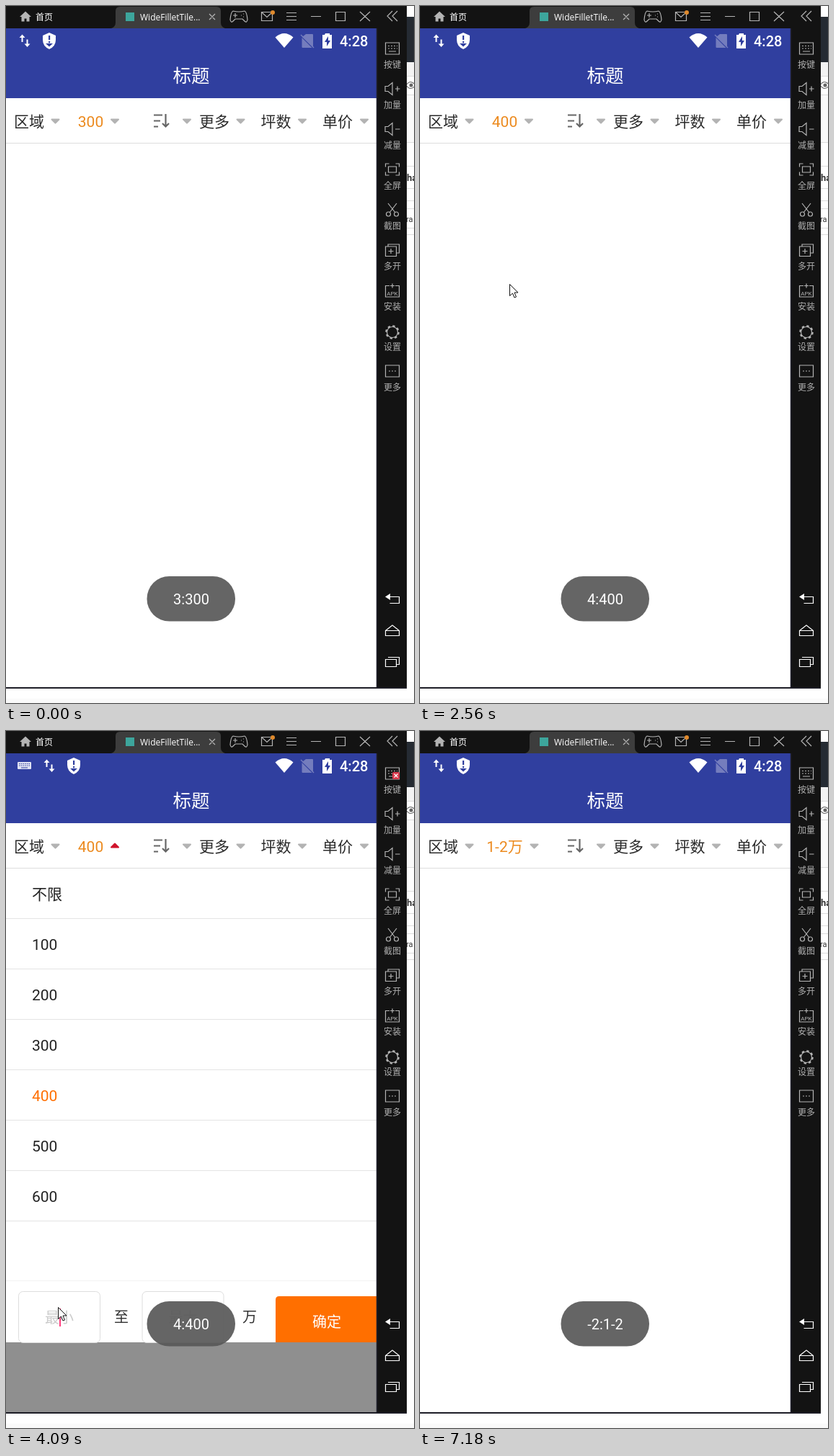
Animation, 566 px wide and 968 px high, one loop 7500 ms. Source, as an HTML page:

```html
<!DOCTYPE html>
<html lang="zh-CN">
<head>
<meta charset="utf-8">
<title>Filter menu</title>
<style>
html, body { margin: 0; width: 100%; height: 100%; overflow: hidden; background: #fff; }
svg { display: block; width: 100vw; height: 100vh; }
text { font-family: Roboto, "Noto Sans CJK SC", "Noto Sans CJK", sans-serif; white-space: pre; }
.mid { text-anchor: middle; }
.line { fill: none; stroke: #b4b4b4; stroke-width: 1.2; }
.ui { font-size: 12px; }
.tab { font-size: 21px; fill: #2a2a2a; }
.field { fill: #fff; stroke: #ddd; }
.in { font-size: 20px; }
</style>
</head>
<body>
<svg viewBox="0 0 566 968">
  <defs>
    <clipPath id="page"><rect y="191" width="514" height="755"/></clipPath>
    <clipPath id="stage"><rect width="566" height="968"/></clipPath>
  </defs>
  <rect width="566" height="968" fill="#fff"/>

  <!-- window behind, at the right edge -->
  <g clip-path="url(#stage)">
    <rect x="556" y="15" width="10" height="63" fill="#252b33"/>
    <rect x="556" y="78" width="10" height="19" fill="#f3f3f3"/>
    <rect x="556" y="124" width="10" height="66" fill="#fafafa"/>
    <path d="M556 97.500h10M556 123.500h10M556 189.500h10M556 222.500h10M556 253.500h10M556 270.500h10M556 281.500h10M556 308.500h10M556 317.500h10" stroke="#ddd"/>
    <path d="M555 110q6-9 13 0q-7 9-13 0z" class="line" style="stroke:#666"/>
    <circle cx="562" cy="110" r="2.500" fill="#666"/>
    <text x="556" y="243" font-size="13" font-weight="700" fill="#333">ha</text>
    <text x="555" y="300" font-size="11" fill="#333">ra</text>
  </g>
  <rect y="962" width="566" height="6" fill="#fafafa"/>

  <!-- page, mask and drop-down panel -->
  <g clip-path="url(#page)">
    <rect id="mask" y="191" width="514" height="755"/>
    <g id="panel">
      <rect y="190" width="514" height="659" fill="#fff"/>
      <g id="content">
        <g id="rows"></g>
        <path d="M0 763.500H514" stroke="#f2f2f2"/>
        <rect class="field" x="17.500" y="778.500" width="113" height="71" rx="6"/>
        <rect class="field" x="189" y="778.500" width="113" height="71" rx="6"/>
        <text id="min" class="in mid" x="74" y="822"></text>
        <text id="max" class="in mid" x="245.500" y="822"></text>
        <rect id="caret" y="802" width="2" height="25" fill="#ff4081"/>
        <g font-size="20" fill="#333" class="mid">
          <text x="160" y="821">至</text><text x="338" y="821">万</text>
        </g>
        <path d="M374 849v-59q0-5 5-5h135v64z" fill="#ff6f00"/>
        <text class="in mid" x="445" y="828" fill="#fff">确定</text>
      </g>
    </g>
  </g>

  <!-- header and filter bar -->
  <rect y="31" width="514" height="97" fill="#303f9f"/>
  <rect y="128" width="514" height="62" fill="#fff"/>
  <path d="M0 190.500H514" stroke="#ddd"/>
  <text x="257" y="106" class="mid" font-size="25.500" fill="#fff">标题</text>
  <g id="kbd">
    <rect x="16" y="43" width="19" height="10" rx="1" fill="#dfe2f2"/>
    <path d="M18 45.500h15M18 48h15" stroke="#303f9f" stroke-dasharray="1.500 1.200"/>
    <path d="M21 51h9" stroke="#303f9f"/>
  </g>
  <g id="status" fill="#fff">
    <path d="M22.500 39.500l4 4.500h-3v6h-2v-6h-3zM29.500 57l-4-4.500h3v-6h2v6h3z"/>
    <path d="M60 37l9 4v6q0 9-9 13q-9-4-9-13v-6z"/>
    <path d="M59 41h2.200v6h-2.200zM59 49h2.200v2.200h-2.200zM55 52h10l-5 4.500z" fill="#303f9f"/>
  </g>
  <path d="M373.500 43.500q12.500-11 25 0L386 58z" fill="#fff"/>
  <path d="M416 39h9q1 0 1 1v17l-15-14zM410.500 44l14 14h-13q-1 0-1-1z" fill="#747dbd"/>
  <path d="M409 40l18 18" stroke="#747dbd" stroke-width="1.500"/>
  <path d="M443 38h6v2h3v19h-13v-19h3z" fill="#fff"/>
  <path d="M447 42l-5 8h3v6l5-8h-3z" fill="#303f9f"/>
  <text x="463" y="56" font-size="20" font-weight="500" fill="#fff">4:28</text>
  <g id="tabs">
    <text id="price" class="tab mid" x="117.500" y="167.500" style="fill:#ec8a1e"></text>
    <path id="priceArrow" d="M-5-2H5L0 3z" stroke-width="2" stroke-linejoin="round"/>
    <path d="M205 151.500h12M205 159.500h9M205 167.500h6M221.500 150v17M217 163l4.500 4.500 4.500-4.500" fill="none" stroke="#666" stroke-width="2.200"/>
  </g>

  <g id="toast">
    <rect x="195.500" y="792" width="122.500" height="62.500" rx="31" fill="#585858" fill-opacity=".92"/>
    <text id="toastText" x="257" y="831" class="in mid" fill="#fff"></text>
  </g>

  <!-- emulator frame -->
  <path d="M0 0H556V948H0V946H514V31H0z" fill="#131313"/>
  <path d="M0 947H556M514.500 31V946" stroke="#20202c" stroke-width="1.500"/>
  <path d="M146 31q6-2 6-8V7q0-6 6-6h134q6 0 6 6v16q0 6 6 8z" fill="#3d3d3d"/>
  <path d="M19 15l8-7.500 8 7.500h-2.500v6.500h-4v-4h-3v4h-4v-6.500z" fill="#b4b4b4"/>
  <text x="41" y="19.500" class="ui" fill="#fff">首页</text>
  <rect x="166" y="9" width="12" height="12" fill="#3da59c"/>
  <text x="186" y="19.500" class="ui" fill="#fff" style="font-family:'Open Sans',sans-serif">WideFilletTile...</text>
  <g class="line">
    <path d="M282 11l8 8M290 11l-8 8M389 9.500h14M389 14.500h14M389 19.500h14M423 14.500h14M457.500 8.500h13v12h-13zM491 8l14 13M505 8l-14 13M536 7l-7 7 7 7M543 7l-7 7 7 7"/>
    <path d="M354.500 8.500h15v12h-15zl7.500 7 7.500-7"/>
    <path d="M315 7q8 2 16 0q3 1 4 12q-1 5-4 2l-3-3h-10l-3 3q-3 3-4-2q1-11 4-12zM315 13h6M318 10v6M326 13h1M329 11h1M329 15h1"/>
  </g>
  <circle cx="370" cy="9" r="3" fill="#e08a2c"/>
  <g id="side"></g>
  <g id="kbdOff">
    <rect x="536" y="57" width="10" height="10" rx="2" fill="#d8394c"/>
    <path d="M538.500 59.500l5 5M543.500 59.500l-5 5" stroke="#fff" stroke-width="1.300"/>
  </g>
  <g fill="none" stroke="#fff" stroke-width="1.200">
    <path d="M532 820.500h13.500v9h-13M526.500 867.500l9.500-7.500 9.500 7.500v7h-19v-7h19M526.500 907.500h15v10h-15zM530 904.500h15.500v10h-4"/>
    <path d="M526 820.500l7-4.500v9z" fill="#fff" stroke="none"/>
  </g>

  <path id="cursor" d="M.5.500V16.500l4-3.500 2.500 6 2.500-1-2.500-6h5z" fill="#fff" stroke="#111"/>
</svg>
<script>
const LOOP = 7500, STEP = 77.5; // the screen refreshes about 13 times a second
const $ = id => document.getElementById(id);
const add = (id, markup) => $(id).insertAdjacentHTML('beforeend', markup);

const ring = (x, y, r) => `M${x - r} ${y}a${r} ${r} 0 1 0 ${2 * r} 0a${r} ${r} 0 1 0 ${-2 * r} 0`;
const speaker = 'M-10-3.500h4l6-5v17l-6-5h-4zM4 0h6.500';
const tools = [
  ['按键', 'M-9.500-8h19v16h-19zM-6-3.500h2m2 0h2m2 0h2m2 0h1M-6 0h2m2 0h2m2 0h2m2 0h1M-5 4h10'],
  ['加量', speaker + 'M7-3.500v7'],
  ['减量', speaker],
  ['全屏', 'M-9.500-3.500v-4.500h5M4.500-8h5v4.500M9.500 3.500v4.500h-5M-4.500 8h-5v-4.500M-5.500-4h11v8h-11z'],
  ['截图', 'M-6-9L4 4M6-9L-4 4' + ring(-5.500, 6, 3) + ring(5.500, 6, 3)],
  ['多开', 'M-6-5v-3h15.500v12h-4M-9.500-5h15v13.500h-15zM-2-2v7M-5.500 1.500h7'],
  ['安装', 'M-4-6.500h-5.500v15.500h19v-15.500h-5.500M0-9.500v6M-3-6.500h6'],
  ['设置', ring(0, 0, 7.5)],
  ['更多', 'M-9.500-8h19v16h-19zM-5 0h2m2 0h2m2 0h2']
];
tools.forEach(([label, d], i) => {
  const y = 59 + 56 * i;
  add('side', `<path class="line" d="${d}" transform="translate(536 ${y + (i == 7 ? 2 : 0)})"/>
    <text class="ui mid" x="536" y="${y + 27}" fill="#b0b0b0">${label}</text>`);
});
add('side', `<text class="mid" x="536" y="402" font-size="8" fill="#b4b4b4">APK</text>
  <circle cx="536" cy="453" r="8.500" fill="none" stroke="#b4b4b4" stroke-width="2.500" stroke-dasharray="3.300 3.376"/>`);

[['区域', 11, 68.5], ['', 0, 251], ['更多', 268, 325.5], ['坪数', 353.5, 411], ['单价', 439, 497]].forEach(([label, x, arrow]) =>
  add('tabs', `<text class="tab" x="${x}" y="167.500">${label}</text>
    <path d="M-5-2H5L0 3z" transform="translate(${arrow} 159.500)" fill="#b3b3b3" stroke="#b3b3b3" stroke-width="2" stroke-linejoin="round"/>`));

['不限', 100, 200, 300, 400, 500, 600].forEach((label, i) =>
  add('rows', `<text x="36" y="${234 + 70 * i}" font-size="21">${label}</text>
    <path d="M0 ${260.5 + 70 * i}H514" stroke="#e4e4e4"/>`));
const rowTexts = [...$('rows').querySelectorAll('text')];

// [time, value, ...] keys, linear between them
function at(keys, t) {
  const i = keys.findIndex(k => k[0] > t);
  if (i < 0) return keys[keys.length - 1].slice(1);
  if (!i) return keys[0].slice(1);
  const a = keys[i - 1], b = keys[i], p = (t - a[0]) / (b[0] - a[0]);
  return a.slice(1).map((v, j) => v + (b[j + 1] - v) * p);
}
const ease = (t, from, to) => {
  const p = Math.min(1, Math.max(0, (t - from) / (to - from)));
  return (1 - Math.cos(p * Math.PI)) / 2;
};

const path = [
  [310, 506, 795], [465, 380, 590], [620, 220, 350], [770, 155, 258], [925, 155, 258],
  [1085, 138, 159], [1235, 138, 159], [1395, 140, 149], [1550, 138, 162], [1705, 134, 251],
  [1860, 136, 364], [2015, 128, 470], [2245, 120, 495], [2400, 120, 495], [2557, 124, 386],
  [2790, 138, 165], [2870, 140, 145], [3022, 138, 160], [3100, 130, 215], [3255, 67, 646],
  [3565, 66, 780], [3860, 72, 800], [4330, 72, 800], [4560, 257, 808], [4710, 257, 808],
  [5040, 257, 805], [5410, 316, 767], [5490, 316, 767], [5580, 412, 818], [5735, 440, 802],
  [5810, 443, 800], [6190, 443, 800], [6495, 73, 79], [6640, 73, 79], [7120, 550, 962]
];
const toastKeys = [[310, 1], [695, 0], [2390, 0], [2550, 1], [5800, 1], [5900, 0], [5950, 0], [6100, 1]];
const CLICKS = [1645, 3040], PICKS = [2350, 5800];

function draw(now) {
  const t = Math.floor((now % LOOP + 10) / STEP) * STEP;
  const picked = t > PICKS[0], done = t > PICKS[1];

  const n = t < CLICKS[1] ? 0 : 1, click = CLICKS[n], pick = PICKS[n];
  const close = 1 - ease(t, pick, pick + 190);
  const alpha = ease(t, click, click + 315) * close;
  const slide = ease(t, click + 60, click + 323) * close;
  $('mask').setAttribute('opacity', .44 * alpha);
  $('content').setAttribute('opacity', alpha);
  $('panel').setAttribute('transform', `translate(0 ${Math.round(-659 * (1 - slide))})`);
  rowTexts.forEach((row, i) => row.setAttribute('fill', i == (picked ? 4 : 3) ? '#ff6f00' : '#222'));

  const open = t > click && t < pick, color = open ? '#d0142c' : '#b3b3b3';
  $('price').textContent = done ? '1-2万' : picked ? '400' : '300';
  $('priceArrow').setAttribute('transform', `translate(${done ? 158.5 : 151} 159.500) rotate(${open ? 180 : 0})`);
  $('priceArrow').setAttribute('fill', color);
  $('priceArrow').setAttribute('stroke', color);

  const typing = t > 3920 && t < 5880, second = t > 4760;
  $('kbd').setAttribute('opacity', +typing);
  $('kbdOff').setAttribute('opacity', +typing);
  $('status').setAttribute('transform', `translate(${typing ? 34 : 0} 0)`);
  const fill = (id, value, hint) => {
    $(id).textContent = value || hint;
    $(id).setAttribute('fill', value ? '#222' : '#ccc');
  };
  fill('min', t > 4320 && '1', '最小');
  fill('max', t > 5030 && '2', '最大');
  $('caret').setAttribute('opacity', +typing);
  $('caret').setAttribute('x', second ? (t > 5030 ? 251 : 245) : t > 4320 ? 80 : 74);

  $('toast').setAttribute('opacity', at(toastKeys, t)[0]);
  $('toastText').textContent = t > 5900 ? '-2:1-2' : t > 2000 ? '4:400' : '3:300';

  $('cursor').setAttribute('opacity', +(t >= 310 && t < 7120));
  $('cursor').setAttribute('transform', `translate(${at(path, t).map(Math.round)})`);
}

const start = performance.now();
(function tick() {
  draw(performance.now() - start);
  requestAnimationFrame(tick);
})();
</script>
</body>
</html>
```
